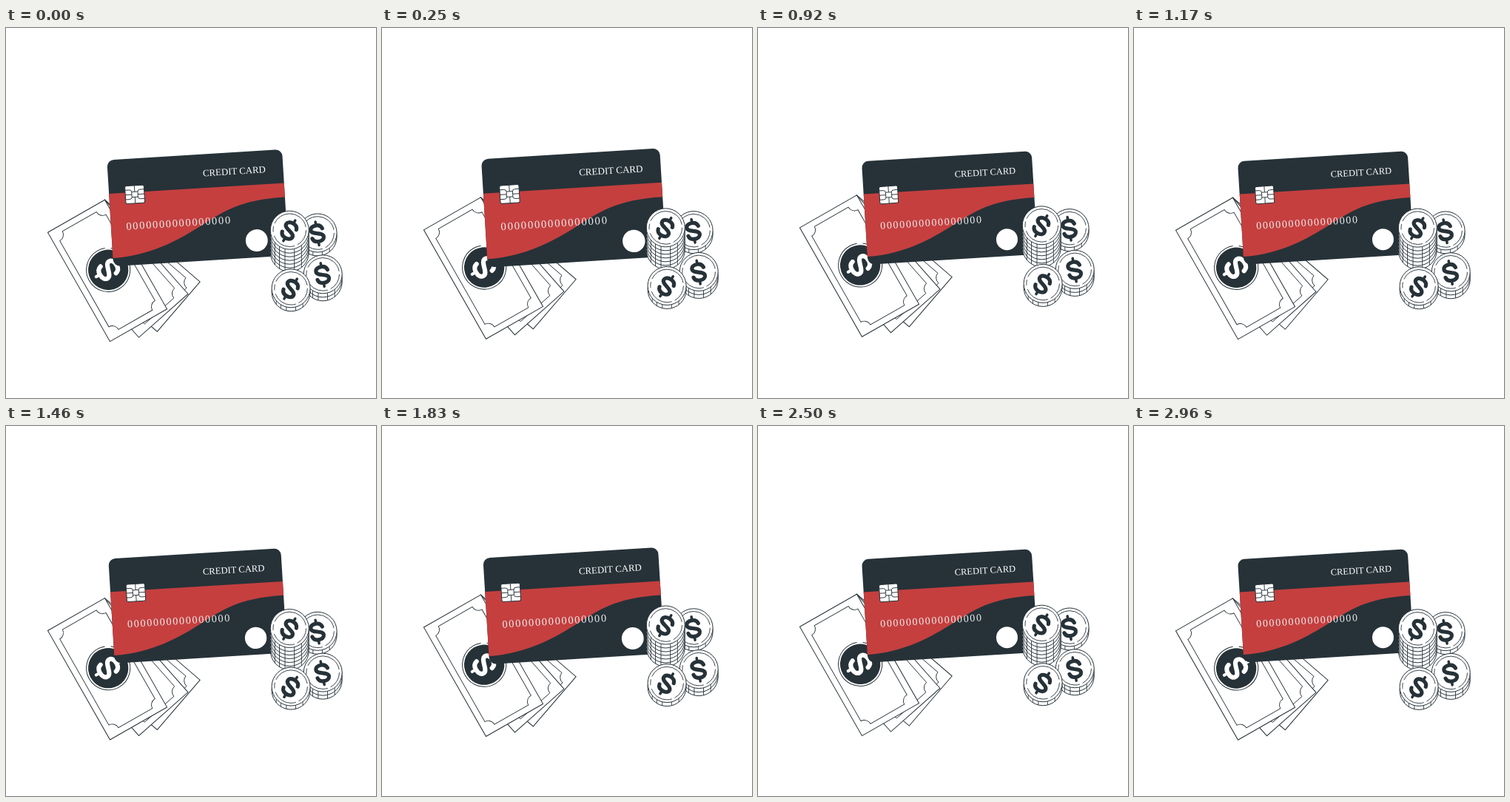
An HTML page that plays this animation: 500 px wide and 500 px high, repeating every 3000 ms.

```html
<!DOCTYPE html>
<html lang="en">
<head>
<meta charset="utf-8">
<title>Card, cash and coins</title>
<style>
  html, body { margin: 0; width: 100%; height: 100%; overflow: hidden; background: #fff; }
  svg { display: block; width: 100vw; height: 100vh; }
  text { font-family: "Liberation Serif", "Times New Roman", serif; fill: #fff; }
  .line { fill: none; stroke: #263238; stroke-width: .9; }
  .paper { fill: #fff; stroke: #263238; stroke-width: 1; }
  .dark { fill: #263238; }
  .sign { fill: none; stroke-width: 4.7; stroke-linecap: round; stroke-linejoin: round; }
</style>
</head>
<body>
<svg viewBox="0 0 500 500">
  <defs>
    <g id="dollar" class="sign">
      <path d="M7-5.3C6-9 3.5-10 0-10C-4.8-10-7.3-7.8-7.3-5C-7.3 1 7.3-1 7.3 5C7.3 7.8 4.8 10 0 10C-3.5 10-6 9-7 5.3"/>
      <path stroke-width="3.2" d="M0-11V-14.5M0 11V14.5"/>
    </g>
  </defs>
  <g id="cash"></g>
  <g id="card">
    <g transform="translate(140 180.4) rotate(-3.52)">
      <rect class="dark" width="230" height="139.6" rx="9"/>
      <path fill="#c53f3f" d="M0 44.3H230V62.8C170 62.8 148 77 117 94C89 109.5 50 128.8 0 128.8Z"/>
      <g transform="translate(21.3 35.5)">
        <rect class="paper" width="25" height="23.3" rx="2"/>
        <path class="line" d="M8.5 8.2H16.5V15.1H8.5ZM12.5 0V8.2M12.5 15.1V23.3
          M0 5.5H5.5Q8.5 5.5 8.5 8.2M25 5.5H19.5Q16.5 5.5 16.5 8.2
          M0 17.8H5.5Q8.5 17.8 8.5 15.1M25 17.8H19.5Q16.5 17.8 16.5 15.1
          M0 11.7H8.5M16.5 11.7H25"/>
      </g>
      <text x="124.5" y="29" font-size="12.45">CREDIT CARD</text>
      <text x="19.9" y="92.8" font-size="14" letter-spacing="1.66" style="fill:#ececec">0000000000000000</text>
      <circle cx="189.6" cy="117.2" r="14.5" fill="#fff"/>
    </g>
  </g>
  <g id="coins"></g>
</svg>
<script>
  const LOOP = 3000, FPS = 24, LEAD = 46, RATE = 1.012, PERIOD = 1500;
  const NOTE_W = 88.7, NOTE_H = 169.7, LAYER = 5, RADIUS = 26;
  const CARD_CENTER = [259, 243.2];
  const BEAT = [[0, 1], [.1, 1.1], [.3, 1], [.4, 1], [.5, 1.1], [.6, 1], [1, 1]];

  const byId = id => document.getElementById(id);

  const dollar = (x, y, angle, color, size) =>
    `<use href="#dollar" stroke="${color}" transform="translate(${x} ${y}) rotate(${angle}) scale(${size})"/>`;

  // Notes fan out around their shared top right corner.
  function note(angle, seal = "") {
    const inset = 8.5, r = 9.5;
    const w = NOTE_W - 2 * (inset + r), h = NOTE_H - 2 * (inset + r);
    const frame = `M${inset + r} ${inset}h${w}a${r} ${r} 0 0 0 ${r} ${r}v${h}` +
      `a${r} ${r} 0 0 0 ${-r} ${r}h${-w}a${r} ${r} 0 0 0 ${-r} ${-r}v${-h}a${r} ${r} 0 0 0 ${r} ${-r}z`;
    return `<g transform="translate(133.5 232.9) rotate(${angle}) translate(${-NOTE_W} 0)">
      <rect class="paper" width="${NOTE_W}" height="${NOTE_H}"/>
      <path class="line" d="${frame}"/>${seal}</g>`;
  }

  const seal = `<g transform="translate(${NOTE_W / 2 + 1.6} ${NOTE_H / 2 - .4})">
    <circle class="paper" r="29.6" stroke-dasharray="150 8 20 8"/>
    <circle class="dark" r="27.2"/>${dollar(0, 0, 90, "#fff", 1.3)}</g>`;

  function coin(x, y, layers, tilt) {
    let out = "";
    for (let i = layers; i > 0; i--) {
      out += `<circle class="paper" cx="${x}" cy="${y + i * LAYER}" r="${RADIUS}"/>`;
      for (const deg of [52, 76, 104, 122, 140]) {
        const a = deg * Math.PI / 180;
        const px = x + RADIUS * Math.cos(a), py = y + (i - 1) * LAYER + RADIUS * Math.sin(a);
        out += `<path class="line" d="M${px} ${py}v${LAYER}"/>`;
      }
    }
    return out + `<circle class="paper" cx="${x}" cy="${y}" r="${RADIUS}"/>
      <circle class="line" cx="${x}" cy="${y}" r="22.3" stroke-dasharray="24 4 34 5 8 4 56 5.1"/>` +
      dollar(x - .5, y + .7, tilt, "#263238", 1.1);
  }

  byId("cash").innerHTML = note(-49.3) + note(-41.5) + note(-29.7, seal);
  byId("coins").innerHTML = coin(421.1, 277.6, 1, -9) + coin(383.3, 273.8, 6, 30) +
    coin(428.2, 333.4, 2, -9) + coin(385.1, 352.4, 1, 33);

  function beatScale(p) {
    const i = BEAT.findIndex(([at]) => at > p);
    const [[a, from], [b, to]] = [BEAT[i - 1], BEAT[i]];
    return from + (to - from) * (p - a) / (b - a);
  }

  function draw(time) {
    const step = Math.floor((time % LOOP) * FPS / 1000);
    const p = Math.min(LOOP, step * 1000 / FPS * RATE + LEAD) % PERIOD / PERIOD;
    const lift = 10 * (1 - Math.abs(2 * p - 1));
    const [cx, cy] = CARD_CENTER;
    for (const id of ["cash", "coins"]) byId(id).setAttribute("transform", `translate(0 ${-lift})`);
    byId("card").setAttribute("transform",
      `translate(${cx} ${cy}) scale(${beatScale(p)}) translate(${-cx} ${-cy})`);
  }

  const start = performance.now();
  function tick() {
    draw(performance.now() - start);
    requestAnimationFrame(tick);
  }
  tick();
</script>
</body>
</html>
```
